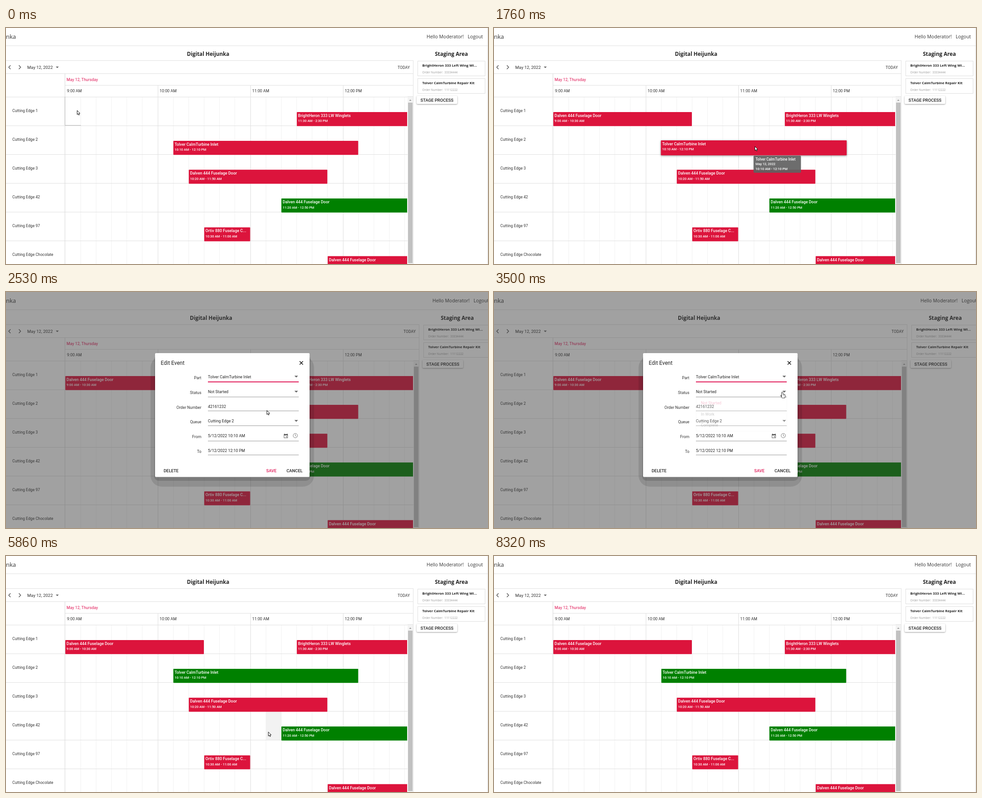
An HTML page with a canvas that plays this animation: 1067x525 px, repeating every 9210 ms.

```html
<!DOCTYPE html>
<html lang="en">
<head>
<meta charset="utf-8">
<title>Digital Heijunka</title>
<style>
html, body { margin: 0; width: 100%; height: 100%; overflow: hidden; background: #fff; }
canvas { display: block; }
</style>
</head>
<body>
<canvas id="stage" width="1067" height="525"></canvas>
<script>
const g = document.getElementById('stage').getContext('2d');
const LOOP = 9210, W = 1067, H = 525;
const RED = '#dc143c', GREEN = '#008000', ACCENT = '#e01a58', INK = '#333';
const GRID_X = 131, GRID_Y = 153, ROW = 64, HOUR = 205, CELL = HOUR / 6;
const ROBOTO = 'Roboto, sans-serif', SANS = '"Open Sans", sans-serif';
const DOOR = 'Dalven 444 Fuselage Door', INLET = 'Tolver CalmTurbine Inlet';

const rows = ['1', '2', '3', '42', '97', 'Chocolate'];
// row, start and end in minutes after 9:00, title, time label
const events = [
  [0, 0, 90, DOOR, '9:00 AM - 10:30 AM'],
  [0, 150, 330, 'BrightHeron 333 LW Winglets', '11:30 AM - 2:30 PM'],
  [1, 70, 190, INLET, '10:10 AM - 12:10 PM'],
  [2, 80, 170, DOOR, '10:20 AM - 11:50 AM'],
  [3, 140, 230, DOOR, '11:20 AM - 12:50 PM'],
  [4, 90, 120, 'Ortiv 880 Fuselage C...', '10:30 AM - 11:00 AM'],
  [5, 170, 260, DOOR, '11:50 AM - 1:20 PM'],
].map(([row, from, to, title, time]) => ({
  x: GRID_X + from * HOUR / 60 + .3, w: (to - from) * HOUR / 60 - .8,
  y: 187 + row * 64.1, h: 31.2, title, time,
}));

// time, x, y of the pointer tip
const path = [
  [610, 157, 183], [780, 359, 202], [950, 579, 227], [1300, 582, 245], [1520, 577, 263],
  [2530, 577, 263], [2650, 577, 270], [3010, 637, 235], [3270, 637, 235], [3360, 639, 223],
  [4250, 639, 223], [4420, 540, 292], [4520, 540, 292], [4760, 581, 391],
  [6420, 580, 391], [6440, 579, 383], [6560, 664, 372], [6680, 579, 364],
  [7100, 579, 364], [7240, 965, 440], [7340, 845, 421], [7530, 845, 421], [7760, 848, 424],
  [7920, 848, 424], [8140, 960, 445], [8310, 1004, 530],
];

const clamp = v => Math.max(0, Math.min(1, v));
const ramp = (t, a, b) => clamp((t - a) / (b - a));
const smooth = v => v * v * (3 - 2 * v);

function pointer(t) {
  const i = path.findIndex(p => p[0] > t);
  if (i === 0) return path[0].slice(1);
  if (i < 0) return path[path.length - 1].slice(1);
  const [a, ax, ay] = path[i - 1], [b, bx, by] = path[i];
  const k = smooth(ramp(t, a, b));
  return [ax + (bx - ax) * k, ay + (by - ay) * k];
}

function text(s, x, y, size, color = INK, weight = 400, align = 'left', family = ROBOTO) {
  g.font = `${weight} ${size}px ${family}`;
  g.fillStyle = color;
  g.textAlign = align;
  g.fillText(s, x, y);
}
function box(x, y, w, h, color) {
  g.fillStyle = color;
  g.fillRect(x, y, w, h);
}
function rounded(x, y, w, h, r, color) {
  g.fillStyle = color;
  g.beginPath();
  g.roundRect(x, y, w, h, r);
  g.fill();
}
function frame(x, y, w, h, color) {
  g.strokeStyle = color;
  g.lineWidth = 1;
  g.strokeRect(x + .5, y + .5, w, h);
}
function poly(points, fill, stroke, width = 1) {
  g.beginPath();
  points.forEach(([x, y]) => g.lineTo(x, y));
  if (fill) { g.closePath(); g.fillStyle = fill; g.fill(); }
  if (stroke) { g.strokeStyle = stroke; g.lineWidth = width; g.stroke(); }
}
const down = (x, y, r) => poly([[x - r, y - r / 2], [x + r, y - r / 2], [x, y + r / 2]], '#666');
function group(draw, alpha = 1) {
  g.save();
  g.globalAlpha *= alpha;
  draw();
  g.restore();
}

// wide is the extra width gained while the page scrollbar is hidden
function header(wide) {
  text('nka', 0, 24, 13, INK, 400, 'left', SANS);
  text('Hello Moderator!', 931 + wide, 23, 10.4, INK, 400, 'left', SANS);
  text('Logout', 1022 + wide, 23, 10.4, INK, 400, 'left', SANS);
  box(0, 39, W, 1, '#e2e2e2');
  if (!wide) box(1066, 0, 1, H, '#dcdcdc');
  text('Digital Heijunka', 447.5 + wide / 2, 62, 11.7, '#222', 700, 'center', SANS);
  text('Staging Area', 986 + wide, 62, 11.7, '#222', 700, 'center', SANS);
}

function staging(wide) {
  const cards = [['BrightHeron 333 Left Wing Wi...', '33334444'], ['Tolver CalmTurbine Repair Kit', '11112222']];
  cards.forEach(([name, order], i) => {
    const x = 911 + wide, y = 73 + i * 38.5;
    frame(x, Math.round(y), 149, 33, '#dedede');
    text(name, x + 10.5, y + 13, 7.8, '#222', 700, 'left', SANS);
    text('Order Number:', x + 10.5, y + 28, 6.4, '#999', 400, 'left', SANS);
    text(order, x + 59.5, y + 28, 6.4, '#999', 400, 'left', SANS);
  });
  group(() => {
    g.shadowColor = 'rgba(0,0,0,.4)';
    g.shadowBlur = 3;
    g.shadowOffsetY = 1;
    rounded(909 + wide, 151, 90, 18, 2, '#fff');
  });
  text('STAGE PROCESS', 917.5 + wide, 163.5, 9.5, '#222', 500);
}

function toolbar(wide) {
  const right = 901 + wide;
  box(0, 72, right, 1, '#e0e0e0');
  box(0, 101, right, 1, '#e0e0e0');
  box(right, 72, 1, H, '#e0e0e0');
  poly([[10, 83], [6, 87.3], [10, 91.6]], null, '#555', 1.4);
  poly([[28.5, 83], [32.5, 87.3], [28.5, 91.6]], null, '#555', 1.4);
  text('May 12, 2022', 47, 90.5, 9.5);
  down(113.5, 87.5, 3.3);
  text('TODAY', 867 + wide, 90.5, 8.6);
  text('May 12, Thursday', 134, 118, 8.9, ACCENT);
  ['9:00 AM', '10:00 AM', '11:00 AM', '12:00 PM'].forEach((s, i) => text(s, 135 + i * HOUR, 143, 8.9));
}

function grid(t, wide, hoverCell) {
  const end = 889 + wide;
  if (hoverCell) box(...hoverCell, '#f2f2f2');
  for (let i = 1; GRID_X + i * CELL < end; i++) {
    const x = Math.round(GRID_X + i * CELL - .4);
    if (i % 6) box(x, GRID_Y, 1, H, '#f1f1f1');
    else box(x, 128, 1, H, '#dedede');
  }
  box(GRID_X, 127, end + 12 - GRID_X, 1, '#e0e0e0');
  rows.forEach((name, i) => {
    box(0, Math.round(152.5 + i * ROW), end, 1, '#e0e0e0');
    text('Cutting Edge ' + name, 14, 187 + i * ROW, 8.7);
  });
  box(end, 152, 12, 1, '#e0e0e0');
  box(130, 101, 1, H, '#d8d8d8');
  if (t < 640) {
    box(130, 153, 1, 64, '#aaa');
    box(130, 216, 36, 1, '#bbb');
  }
}

function drawEvent(e, color, hovered) {
  const o = hovered ? 1 : 0;
  group(() => {
    if (hovered) {
      g.shadowColor = 'rgba(0,0,0,.45)';
      g.shadowBlur = 4;
      g.shadowOffsetY = 1;
    }
    rounded(e.x - o, e.y - o, e.w + 2 * o, e.h + 2 * o, 1, color);
  });
  text(e.title, e.x + 2.8 - o, e.y + 11 - o, 8.9, '#fff', 500);
  text(e.time, e.x + 2.8 - o, e.y + 22.3 - o, 7.4, '#fff', 500);
}

function scrollbar(wide, hot) {
  const x = 889 + wide;
  box(x, 153, 12, H, '#f3f3f3');
  poly([[x + 3.5, 162], [x + 8.5, 162], [x + 6, 159]], '#999');
  box(x + 1, 166, 10, 357, hot ? '#a8a8a8' : '#c1c1c1');
}

function tooltip(x, y, title, time, alpha) {
  if (alpha <= 0) return;
  group(() => {
    rounded(x, y, 105, 38, 2, 'rgba(97,97,97,.92)');
    text(title, x + 4.5, y + 10.5, 8.15, '#fff', 500);
    text('May 12, 2022', x + 4.5, y + 21, 7.3, '#fff', 500);
    text(time, x + 4.5, y + 31.7, 7.5, '#fff', 500);
  }, alpha);
}

function calendarIcon(x, y) {
  frame(x - 4, y - 4, 8, 8, '#666');
  box(x - 4, y - 4, 9, 3, '#666');
  box(x - 3, y - 5, 1, 1, '#666');
  box(x + 3, y - 5, 1, 1, '#666');
  box(x + 1, y + 1, 2, 2, '#666');
}
function clockIcon(x, y) {
  g.beginPath();
  g.arc(x, y, 4.8, 0, 7);
  g.strokeStyle = '#777';
  g.lineWidth = 1;
  g.stroke();
  poly([[x, y - 3], [x, y], [x + 2.3, y + 1.5]], null, '#777');
}

function dropdown(alpha, hot) {
  if (alpha <= 0) return;
  group(() => {
    box(448, 235, 200, 74, '#fff');
    frame(447, 234, 201, 75, '#e6e6e6');
    if (hot >= 0 && hot < 3) box(448, 235 + hot * 24.6, 200, 24.6, '#f4f4f4');
    ['Not Started', 'In Work', 'Complete'].forEach((s, i) =>
      text(s, 458, 250 + i * 24.6, 8.9, i ? INK : ACCENT));
  }, alpha);
}

function dialog(t, scale, mouse) {
  const done = t > 4480, focus = t < 3540 ? 0 : 1;
  const focusLine = 2 - ramp(t, 5250, 5320);
  g.save();
  g.translate(501, 273.5);
  g.scale(scale, scale);
  g.translate(-501, -273.5);
  rounded(320, 143, 362, 290, 25, 'rgba(0,0,0,.11)');
  rounded(328, 140, 346, 280, 10, 'rgba(0,0,0,.14)');
  rounded(330, 136, 342, 275.5, 2, '#fff');
  text('Edit Event', 342.5, 161.5, 12, '#222');
  poly([[650, 154], [657.5, 161.5]], null, '#111', 1.5);
  poly([[657.5, 154], [650, 161.5]], null, '#111', 1.5);
  const fields = [
    ['Part', INLET, 191.5, 199], ['Status', done ? 'Complete' : 'Not Started', 225, 233],
    ['Order Number', '42161232', 257.7, 264], ['Queue', 'Cutting Edge 2', 290, 297],
    ['From', '5/12/2022 10:10 AM', 323.3, 331], ['To', '5/12/2022 12:10 PM', 356, 362],
  ];
  fields.forEach(([label, value, y, line], i) => {
    text(label, 432.5, y + 2, 8.8, INK, 400, 'right');
    text(value, 447, y, 8.9, '#222');
    if (i === focus) box(447, line, 201, focusLine, ACCENT);
    else box(447, line, 201, 1, '#999');
    if (i < 2 || i === 3) down(642.5, y - 3.3, 4);
  });
  calendarIcon(619, 320);
  clockIcon(640.5, 319.5);
  if (t > 4700) rounded(567, 387, 41, 19, 2, '#fdf5f8');
  text('DELETE', 349, 400.5, 9.4, '#222', 500);
  text('SAVE', 576, 400.5, 9.4, ACCENT, 500);
  text('CANCEL', 621, 400.5, 9.4, '#222', 500);
  const open = t < 4480 ? (t < 3500 ? 0 : .25 + .75 * ramp(t, 3500, 3760)) : 1 - ramp(t, 4480, 4660);
  dropdown(open, Math.floor((mouse[1] - 235) / 24.6));
  g.restore();
}

function cursor(x, y, hand) {
  g.save();
  g.translate(x, y);
  g.lineJoin = 'round';
  if (hand) {
    g.beginPath();
    g.roundRect(-2, 0, 2.2, 8, 1.1);
    g.roundRect(-2.5, 4.5, 7.5, 8, 2.5);
    g.strokeStyle = '#111';
    g.lineWidth = 1.7;
    g.stroke();
    g.fillStyle = '#fff';
    g.fill();
    poly([[-2.2, 9.5], [-4.3, 6.6]], null, '#111', 1.3);
    [1, 3].forEach(u => poly([[u, 5], [u, 7.5]], null, '#555', .7));
  } else {
    poly([[.5, .5], [.5, 9.5], [2.6, 7.6], [4, 10.8], [5.5, 10.1], [4.1, 7], [6.9, 7], [.5, .5]], '#fff', '#111', 1);
  }
  g.restore();
}

function draw(t) {
  const mouse = pointer(t), [mx, my] = mouse;
  const modal = t >= 1930 && t < 5600, wide = modal ? 13 : 0;
  const visible = events.filter((e, i) => i || t >= 90);
  const under = t < 2000 || !modal
    ? visible.find(e => mx >= e.x && mx < Math.min(e.x + e.w, 889) && my >= e.y && my < e.y + e.h) : null;
  let cell = null;
  if (t > 5700 && !under && mx >= GRID_X && mx < 889 && my > GRID_Y && my < H) {
    const cx = GRID_X + Math.floor((mx - GRID_X) / CELL) * CELL;
    cell = [Math.round(cx), GRID_Y + Math.floor((my - GRID_Y) / ROW) * ROW, 34, ROW];
  }

  box(0, 0, W, H, '#fff');
  header(wide);
  toolbar(wide);
  grid(t, wide, cell);
  g.save();
  g.beginPath();
  g.rect(GRID_X - 1, GRID_Y, 758 + wide, H);
  g.clip();
  visible.forEach(e => {
    const green = e === events[4] || (e === events[2] && t > 5700);
    drawEvent(e, green ? GREEN : RED, e === under);
  });
  g.restore();
  scrollbar(wide, !modal && mx > 889 && mx < 901 && my > 166);
  staging(wide);

  tooltip(359, 232.5, DOOR, events[0].time, Math.min(ramp(t, 760, 860), 1 - .12 * ramp(t, 900, 950) - ramp(t, 960, 1080)));
  if (!modal) tooltip(574.5, 284, INLET, events[2].time, t < 1930 ? ramp(t, 1540, 1760) : 0);

  if (modal) {
    box(0, 0, W, H, 'rgba(60,60,60,.48)');
    if (t < 1970) box(575, 285, 104, 8, 'rgba(110,110,110,.25)');
    const grow = .07 + .93 * smooth(ramp(t, 1950, 2260));
    const shrink = 1 - smooth(ramp(t, 5400, 5600));
    dialog(t, grow * shrink, mouse);
  }
  cursor(mx, my, t > 3300 && t < 5600);
}

function tick(now) {
  draw(now % LOOP);
  requestAnimationFrame(tick);
}
requestAnimationFrame(tick);
</script>
</body>
</html>
```
